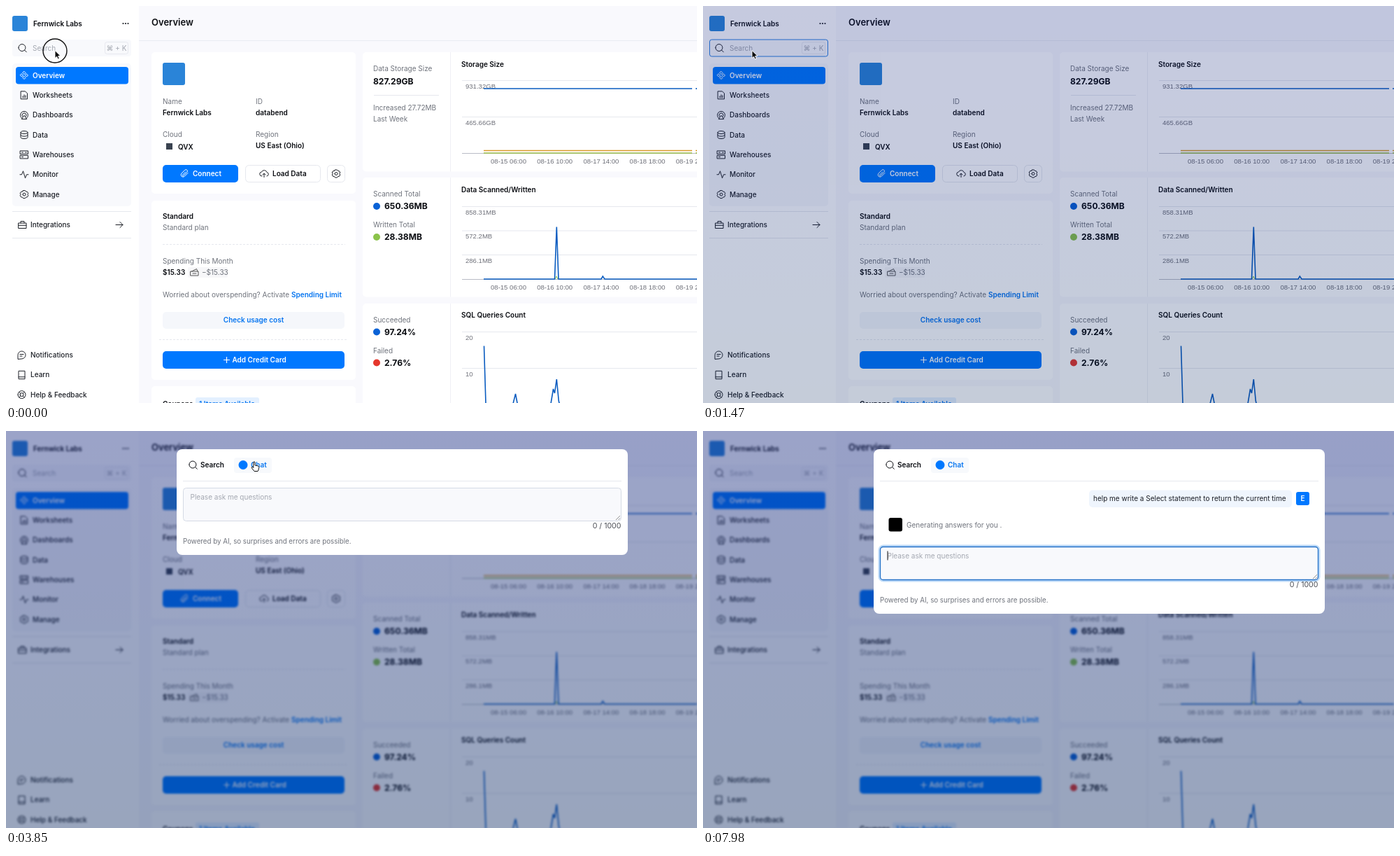
An HTML page that plays this animation: 988 by 567 pixels, repeating every 8 s.

```html
<!DOCTYPE html>
<html lang="en">
<head>
<meta charset="utf-8">
<title>Dashboard search and chat</title>
<style>
html, body { margin: 0; width: 100%; height: 100%; overflow: hidden; background: #fff; }
svg { display: block; width: 988px; height: 567px; }
text { font: 10px Inter, sans-serif; fill: #1c1f26; white-space: pre; }
.b { font-weight: 600; fill: #0b0d12; }
.m { font-weight: 450; }
.g { fill: #6f737c; }
.l { fill: #a4a8b1; }
.blue { fill: #0474f0; }
.w { fill: #fff; }
.big { font-size: 12.1px; font-weight: 700; }
.h1 { font-size: 13px; }
.ph { font-size: 11.65px; }
.hint { font-size: 9.75px; }
.count { font-size: 10.6px; fill: #4a4d55; text-anchor: end; }
.ax { font: 9.55px "Liberation Sans", Arial, sans-serif; fill: #6e7079; }
.mid { text-anchor: middle; }

.t { animation: 8s linear infinite both; }
.s { animation: 8s step-end infinite both; }

#page { animation-name: blur; }
@keyframes blur { 0%, 17.5% { filter: blur(0); } 21%, 100% { filter: blur(1.4px); } }
#shade { animation-name: shade; }
@keyframes shade { 0%, 11.3% { opacity: 0; } 17.5% { opacity: .17; } 21%, 100% { opacity: .4; } }
#focus { animation-name: focus; }
@keyframes focus { 0%, 1% { opacity: 0; } 5%, 20% { opacity: 1; } 23%, 100% { opacity: 0; } }
#ring { animation-name: ring; }
@keyframes ring { 0%, .8% { opacity: 1; transform: none; } 4%, 100% { opacity: 0; transform: scale(.8); } }

#finder { animation-name: finder; }
@keyframes finder { 0%, 21.4% { opacity: 0; } 24.3%, 45.5% { opacity: 1; } 47%, 100% { opacity: 0; } }
#rows { animation-name: rows; }
@keyframes rows { 0%, 27.2% { opacity: .5; } 30%, 100% { opacity: 1; } }
.line { animation-name: line; }
@keyframes line { 0%, 27.2% { opacity: 0; } 30%, 100% { opacity: 1; } }
#finderGlow { animation-name: finderGlow; }
@keyframes finderGlow { 0%, 24% { opacity: 0; } 26%, 43.7% { opacity: 1; } 44.6%, 100% { opacity: 0; } }
#finderCaret { animation-name: finderCaret; }
@keyframes finderCaret { 0% { opacity: 0; } 25% { opacity: 1; } 31.5% { opacity: 0; } 37.8% { opacity: 1; } 43.7%, 100% { opacity: 0; } }
#hover { animation-name: hover; }
@keyframes hover { 0%, 41% { fill: #0b0d12; } 42%, 100% { fill: #0474f0; } }

#chat { animation-name: chat; }
@keyframes chat { 0%, 45.5% { opacity: 0; } 47%, 100% { opacity: 1; } }
#sheet { animation-name: sheet; }
@keyframes sheet { 0%, 87.4% { height: 151px; } 88.4%, 100% { height: 235px; } }
#form { animation-name: form; }
@keyframes form { 0%, 87.4% { transform: none; } 88.4%, 100% { transform: translateY(84px); } }
#chatLine { animation-name: chatLine; }
@keyframes chatLine { 0%, 57% { opacity: 0; } 58%, 100% { opacity: 1; } }
#chatGlow { animation-name: chatGlow; }
@keyframes chatGlow { 0%, 57.7% { opacity: 0; } 62%, 100% { opacity: 1; } }
.empty { animation-name: empty; }
@keyframes empty { 0% { opacity: 1; } 68.2% { opacity: 0; } 87.6%, 100% { opacity: 1; } }
.filled { animation-name: filled; }
@keyframes filled { 0% { opacity: 0; } 68.2% { opacity: 1; } 87.6%, 100% { opacity: 0; } }
#caretA { animation-name: caretA; }
@keyframes caretA { 0% { opacity: 0; } 57.6% { opacity: 1; } 63.8% { opacity: 0; } 66.4% { opacity: 1; } 68.2% { opacity: 0; } 87.6%, 100% { opacity: 1; } }
#caretB { animation-name: caretB; }
@keyframes caretB { 0% { opacity: 0; } 68.2% { opacity: 1; } 74.3% { opacity: 0; } 80.4% { opacity: 1; } 87.6%, 100% { opacity: 0; } }
#talk { animation-name: talk; }
@keyframes talk { 0%, 87.4% { opacity: 0; } 88.8%, 100% { opacity: 1; } }
#dots { animation-name: dots; }
@keyframes dots { 0% { opacity: 0; } 93.6% { opacity: 1; } 99.7%, 100% { opacity: 0; } }

#pointer { animation-name: pointer; }
@keyframes pointer {
  0%, 29.6% { transform: translate(70px, 64px); animation-timing-function: ease-in-out; }
  40.5%, 53.2% { transform: translate(355px, 45px); animation-timing-function: ease-in-out; }
  55.2%, 100% { transform: translate(365px, 99px); }
}
#arrow { animation-name: arrow; }
@keyframes arrow { 0% { opacity: 1; } 40.8%, 100% { opacity: 0; } }
#hand { animation-name: hand; }
@keyframes hand { 0% { opacity: 0; } 40.8% { opacity: 1; } 54%, 100% { opacity: 0; } }
#beam { animation-name: beam; }
@keyframes beam { 0%, 54% { opacity: 0; } 54.1%, 74.3% { opacity: 1; } 76.2%, 100% { opacity: 0; } }
</style>
</head>
<body>
<svg id="stage" viewBox="0 0 988 567"></svg>
<script>
const BLUE = '#0078ff', LINE = '#e6e8ee', SOFT = '#f8f9fc', INK = '#1c1f26', CHART = '#0a5cc0';
const TILE = '#2a84d8', GLOW = '#bddaf8';

// Line icons in a 12 px box around the origin.
const ICONS = {
  search: 'M-5.6-.5a5 5 0 1 0 10 0a5 5 0 1 0-10 0M3 3l2.8 2.8',
  overview: 'M0-5.5l2 2-2 2-2-2zM0 1.5l2 2-2 2-2-2zM-3.5-2l2 2-2 2-2-2zM3.5-2l2 2-2 2-2-2z',
  sheet: 'M-4.5-5.5h6l3 3v8h-9zM-2 3.5v-2M0 3.5v-4M2 3.5v-3',
  dash: 'M-3.5 4.5a5.5 5.5 0 1 1 7 0M-2 2.5a3 3 0 1 1 4 0M-3.5 5.5l3.5-5 3.5 5z',
  data: 'M-5-3.5a5 2 0 0 1 10 0a5 2 0 0 1-10 0v7a5 2 0 0 0 10 0v-7M-5 0a5 2 0 0 0 10 0',
  house: 'M-5.5-5.5h11v4.5h-11zM-5.5 1h11v4.5h-11zM-3.5-3.3h2M-3.5 3.2h2M1.5-3.3h2',
  pulse: 'M-6 0h2.5l2-5 3 10 2-5h2.5',
  gear: 'M-1.5-5.5h3l1 1.5 2 .2 1.3 2.3-1 1.5 1 1.5-1.3 2.3-2 .2-1 1.5h-3l-1-1.5-2-.2-1.3-2.3 1-1.5-1-1.5 1.3-2.3 2-.2zM-2 0a2 2 0 1 0 4 0a2 2 0 1 0-4 0',
  bag: 'M-5.5-2.5h11v7.5h-11zM-2.5-2.5v-2.5h5v2.5M-5.5 .8h11',
  next: 'M-5 0h10M1-4l4 4-4 4',
  note: 'M-5.5 5.5v-5.5a5.5 5.5 0 1 1 5.5 5.5zM-2.5-1h5M-2.5 1.5h3',
  book: 'M-4.5 5.5v-11h9v11zM-4.5 3h9',
  help: 'M-5.5 0a5.5 5.5 0 1 0 11 0a5.5 5.5 0 1 0-11 0M-2.5 0a2.5 2.5 0 1 0 5 0a2.5 2.5 0 1 0-5 0M-4-4l2 2M4-4l-2 2M-4 4l2-2M4 4l-2-2',
  clip: 'M5-1l-5 5a3 3 0 0 1-4.2-4.2l5-5a2 2 0 0 1 3 3l-5 5a.8.8 0 0 1-1.2-1.2l4-4',
  cloud: 'M-3 3.5a3 3 0 0 1-.5-6a4 4 0 0 1 7.5.5a2.8 2.8 0 0 1 0 5.5M0 5v-5M-2 1.5l2-2 2 2',
  ticket: 'M-5.5-1.5h11v6h-11zM-4-1.5l7-3.5 1.5 3.5M-2.5 1.5h5',
  grid: 'M-5.5-5.5h11v11h-11zM-5.5-1.8h11M-5.5 1.8h11M-1.8-5.5v11M1.8-5.5v11',
  plus: 'M-4 0h8M0-4v8'
};

const text = (x, y, s, cls = '', extra = '') => `<text x="${x}" y="${y}" class="${cls}" ${extra}>${s}</text>`;
const box = (x, y, w, h, fill, r = 0, stroke = 'none', extra = '') =>
  `<rect x="${x}" y="${y}" width="${w}" height="${h}" rx="${r}" fill="${fill}" stroke="${stroke}" ${extra}/>`;
const dot = (x, y, r, fill) => `<circle cx="${x}" cy="${y}" r="${r}" fill="${fill}"/>`;
const path = (d, stroke, w = 1, extra = '') =>
  `<path d="${d}" fill="none" stroke="${stroke}" stroke-width="${w}" ${extra}/>`;
const rule = (x1, x2, y, stroke = LINE, extra = '') => path(`M${x1} ${y}H${x2}`, stroke, 1, extra);
const icon = (name, x, y, stroke = INK, w = 1) =>
  path(ICONS[name], stroke, w, `transform="translate(${x} ${y})" stroke-linejoin="round" stroke-linecap="round"`);
const group = (id, cls, ...parts) => `<g id="${id}" class="${cls}">${parts.flat().join('')}</g>`;
const caret = (id, x, y, h) => box(x, y, 1, h, '#111', 0, 'none', `id="${id}" class="s"`);

function sidebar() {
  const nav = [['overview', 'Overview'], ['sheet', 'Worksheets'], ['dash', 'Dashboards'], ['data', 'Data'],
    ['house', 'Warehouses'], ['pulse', 'Monitor'], ['gear', 'Manage']];
  const foot = [['note', 'Notifications'], ['book', 'Learn'], ['help', 'Help &amp; Feedback']];
  return [
    box(0, 0, 190, 567, '#fff'),
    box(9, 14, 22, 22, TILE, 3), text(39, 28.5, 'Fernwick Labs', 'b'),
    [167.5, 171, 174.5].map(x => dot(x, 25, 1.1, INK)),
    box(9, 48, 170, 24, SOFT, 4), icon('search', 23.5, 60), text(38, 63.5, 'Search', 'l'),
    box(141.5, 51.5, 33, 17, 'none', 3, LINE), text(158, 63.5, '⌘ + K', 'l mid'),
    box(9.5, 48, 169, 24, 'none', 3, '#2b7fe0', 'id="focus" class="t"'),
    box(9, 82, 170, 204, SOFT, 5), box(14, 87, 161, 24.5, BLUE, 4),
    nav.map(([name, label], i) => {
      const y = 99 + 28.35 * i;
      return icon(name, 26, y, i ? INK : '#fff') + text(38, y + 3.6, label, i ? 'm' : 'b w');
    }),
    rule(9, 179, 293.5), icon('bag', 23.5, 312.5), text(35, 316, 'Integrations', 'm'),
    icon('next', 162, 312.5), rule(9, 179, 331.5),
    foot.map(([name, label], i) => icon(name, 22.5, 498.5 + 28.3 * i) + text(35, 502 + 28.3 * i, label, 'm'))
  ];
}

function cards() {
  const dashes = 'stroke-dasharray="3 2"';
  return [
    rule(190, 988, 49.5, '#e9ebf2'), text(208, 28, 'Overview', 'b h1'),
    box(208, 66, 292, 202, '#fff', 5), box(208, 278, 292, 256, '#fff', 5), box(208, 543, 292, 40, '#fff', 5),
    box(224, 81, 32, 32, TILE, 3),
    text(224, 139.5, 'Name', 'g'), text(224, 155.5, 'Fernwick Labs', 'b'),
    text(357, 139.5, 'ID', 'g'), text(357, 155.5, 'databend', 'b'),
    text(224, 187, 'Cloud', 'g'), box(229, 196, 9, 9, '#3a4350'), text(246, 204.5, 'QVX', 'b'),
    text(357, 187, 'Region', 'g'), text(357, 202.5, 'US East (Ohio)', 'b'),
    box(224, 227, 108, 25, BLUE, 5), icon('clip', 255, 239.5, '#fff'), text(267, 243, 'Connect', 'b w'),
    box(342.5, 227.5, 107, 24, '#fff', 5, LINE), icon('cloud', 369, 239.5), text(381, 243, 'Load Data', 'b'),
    box(459.5, 227.5, 25, 24, '#fff', 5, LINE), icon('gear', 472, 239.5),
    text(224, 304, 'Standard', 'b'), text(224, 320, 'Standard plan', 'g'),
    rule(224, 485, 340.5, LINE, dashes),
    text(224, 368, 'Spending This Month', 'g'), text(224, 384, '$15.33', 'b'),
    box(260, 373, 57, 15, '#f7f7f9', 2), icon('ticket', 269.5, 380.5, '#555'), text(280, 384, '−$15.33', 'g'),
    text(224, 415.5, 'Worried about overspending? Activate', 'g'), text(408, 415.5, 'Spending Limit', 'b blue'),
    box(224, 437, 260, 24, '#f5f7fb', 5), text(354, 451.5, 'Check usage cost', 'b blue mid'),
    rule(219, 489, 476.5, LINE, dashes),
    box(224, 493, 260, 25, BLUE, 5), icon('plus', 315.5, 505.5, '#fff', 1.2), text(323.5, 509, 'Add Credit Card', 'b w'),
    text(224, 571.5, 'Coupons', 'b'), box(271, 559, 91, 18, '#e3f0ff', 3), text(276, 571.5, '1 Items Available', 'b blue')
  ];
}

function charts() {
  const dates = y => [15, 16, 17, 18, 19].map((d, i) =>
    text(718.5 + 66.2 * i, y, `08-${d} ${['06', '10', '14', '18', '22'][i]}:00`, 'ax mid'));
  const scale = (y, step, labels) => labels.map((s, i) =>
    rule(652, 988, y + step * i) + text(657, y + step * i + 11, s, 'ax'));
  const total = (y, label, value, color) =>
    text(525, y, label, 'g') + dot(530, y + 14, 5, color) + text(541, y + 18.2, value, 'b big');
  return [
    [66, 245, 425].map(y => box(510, y, 490, 170.5, '#fff', 5) + path(`M635.5 ${y}v170.5`, '#eff0f5')),
    text(525, 92.5, 'Data Storage Size', 'g'), text(525, 111.5, '827.29GB', 'b big'), rule(526, 619, 127.5),
    text(525, 149, 'Increased 27.72MB', 'g'), text(525, 165, 'Last Week', 'g'),
    text(651, 86.5, 'Storage Size', 'b'), scale(106.5, 52, ['931.32GB', '465.66GB']),
    rule(652, 988, 210.5, '#b9bcc6'),
    path('M683 118H981M986 118h4', CHART, 1.6), path('M683 206.5H981M986 206.5h4', '#d99a2b', 1.6),
    path('M683 210H981M986 210h4', '#9cbf4a', 1.6), dates(224.5),

    total(272, 'Scanned Total', '650.36MB', '#0a62d6'), total(316, 'Written Total', '28.38MB', '#8bc34a'),
    text(651, 265.5, 'Data Scanned/Written', 'b'), scale(286.5, 34.5, ['858.31MB', '572.2MB', '286.1MB']),
    rule(652, 988, 390.5, '#b9bcc6'), path('M785 390l2-4 2 4', '#8bc34a'),
    path('M683 390H784.5L787.3 315.5 790 390H851L853.3 386 856 390H988', CHART, 1.6), dates(404.5),

    total(451.5, 'Succeeded', '97.24%', '#0a62d6'), total(495.5, 'Failed', '2.76%', '#e5372c'),
    text(651, 445, 'SQL Queries Count', 'b'), scale(465.5, 52, ['20', '10']),
    path('M683.5 485.5L686 568M725 568l3.5-14 2.7 14M779 568l3.5-21 2 6 2.8-20 3 31 1 4', CHART, 1.6)
  ];
}

const tabs = (x, searchColor, chatColor, chatText) => [
  icon('search', x + 23.5, 48.5, searchColor), text(x + 34, 52, 'Search', 'b', `style="fill:${searchColor}"`),
  dot(x + 95, 48.5, 6.5, chatColor), text(x + 106, 52, 'Chat', ...chatText)
];

// Dark veil over the page, bluer towards the top.
const shade = () =>
  '<linearGradient id="veil" x2="0" y2="1"><stop stop-color="#081c78"/><stop offset="1" stop-color="#00205a"/></linearGradient>' +
  box(0, 0, 988, 567, 'url(#veil)', 0, 'none', 'id="shade" class="t"');

function finder() {
  const recent = [['sheet', '2023-08-17 06:23:38'], ['sheet', '2022-07-12 18:21:54'], ['sheet', '2023-08-21 06:54:50'],
    ['grid', 'ethlogs', 'In default | Viewed an hour ago'], ['data', 'default'], ['data', 'book_db', 'Viewed 2 hours ago'],
    ['data', 'database1', 'Viewed 3 days ago'], ['data', 'b', 'Viewed 4 days ago']];
  return group('finder', 't',
    box(241, 26, 645, 600, '#fff', 8), box(253, 38, 61, 22, '#f7f9fc', 4),
    tabs(241, '#0474f0', '#0b0d12', ['b t', 'id="hover"']), rule(253, 876, 71.5, '#eceef3'),
    box(249, 80, 628, 33, 'none', 5, GLOW, 'stroke-width="3" id="finderGlow" class="t"'),
    box(250.5, 81.5, 625, 30.5, SOFT, 4, '#3d8ae0'),
    icon('search', 268, 97, INK, 1.2), text(283, 101, 'Search Worksheets / Databases / Warehouses / Cloud Documents', 'l ph'),
    caret('finderCaret', 283, 90, 14),
    rule(251, 876, 122.5, '#eceef3'), text(256, 149.5, 'Recent', 'b'),
    group('rows', 't', recent.map(([name, title, sub = 'Viewed an hour ago'], i) => {
      const y = 163.5 + 53.35 * i;
      return box(256.5, y, 607, 49.5, '#fff', 4, LINE, 'class="line t"') + box(268, y + 13, 22, 22, SOFT, 4) +
        icon(name, 279, y + 24) + text(298, y + 20.7, title, 'b') + text(298, y + 35.7, sub, 'g');
    })));
}

function chat() {
  const ask = 'help me write a Select statement to return the current time';
  return group('chat', 't',
    box(244, 26, 645, 151, '#fff', 8, 'none', 'id="sheet" class="t"'), box(326, 38, 54, 22, '#f7f9fc', 4),
    tabs(244, '#0b0d12', BLUE, ['b blue']), rule(253, 880, 71.5),
    group('talk', 't',
      box(552, 84.5, 290, 24.5, '#eff5fd', 5), text(558, 100.2, ask),
      box(848, 87, 19, 19, BLUE, 3), text(857.5, 100, 'E', 'b w mid'),
      box(265.5, 124, 19.5, 19.5, '#000', 3), text(291, 137.5, 'Generating answers for you .', 'g'),
      group('dots', 's', box(426, 136, 1.4, 1.4, '#6f737c'), box(428.6, 136, 1.4, 1.4, '#6f737c'))),
    group('form', 't',
      box(252, 80, 629, 50, 'none', 6, GLOW, 'stroke-width="3" id="chatGlow" class="t"'),
      box(253.5, 81.5, 626, 47, SOFT, 4, '#d5dae5'),
      box(253.5, 81.5, 626, 47, 'none', 4, '#2472c8', 'stroke-width="1.3" id="chatLine" class="t"'),
      path('M872 127l6-6M875.5 127l2.5-2.5', '#777', .8),
      text(263.5, 97.5, 'Please ask me questions', 'l empty s'), text(263.5, 97.5, ask, 'filled s'),
      caret('caretA', 263.5, 87.5, 13), caret('caretB', 540.5, 87.5, 13),
      text(879.5, 139.2, '0 / 1000', 'count empty s'), text(879.5, 139.2, '59 / 1000', 'count filled s'),
      text(253, 160.5, 'Powered by AI, so surprises and errors are possible.', 'g hint')));
}

function pointer() {
  const shape = (d, fill, stroke) => `<path d="${d}" fill="${fill}" stroke="${stroke}" stroke-linejoin="round"/>`;
  return group('pointer', 't',
    '<circle id="ring" class="t" r="17" fill="none" stroke="#111" stroke-width="1.4"/>',
    group('arrow', 's', shape('M0-.5V10.5l2.6-2.3 1.7 3.8 2-.9-1.7-3.7H8z', '#000', '#fff')),
    group('hand', 's', shape('M-1.2 0c0-1.6 2.2-1.6 2.2 0v4l4 .8c1.4.4 1.8 1.2 1.6 2.6l-.8 3.6-.8 1.5h-5l-3.6-4.6c-.8-1.3.6-2.2 1.5-1.3l.9.9z', '#fff', '#111')),
    group('beam', 't', path('M-2.5-6q2.5 0 2.5 1.5q0-1.5 2.5-1.5M0-5V6M-2.5 6.5q2.5 0 2.5-1.5q0 1.5 2.5 1.5M-1.5 2.5h3', '#111', 1.2)));
}

document.getElementById('stage').innerHTML = [
  group('page', 't', box(0, 0, 988, 567, '#f9f9fd'), sidebar(), cards(), charts()),
  shade(), finder(), chat(), pointer()
].join('');
</script>
</body>
</html>
```
